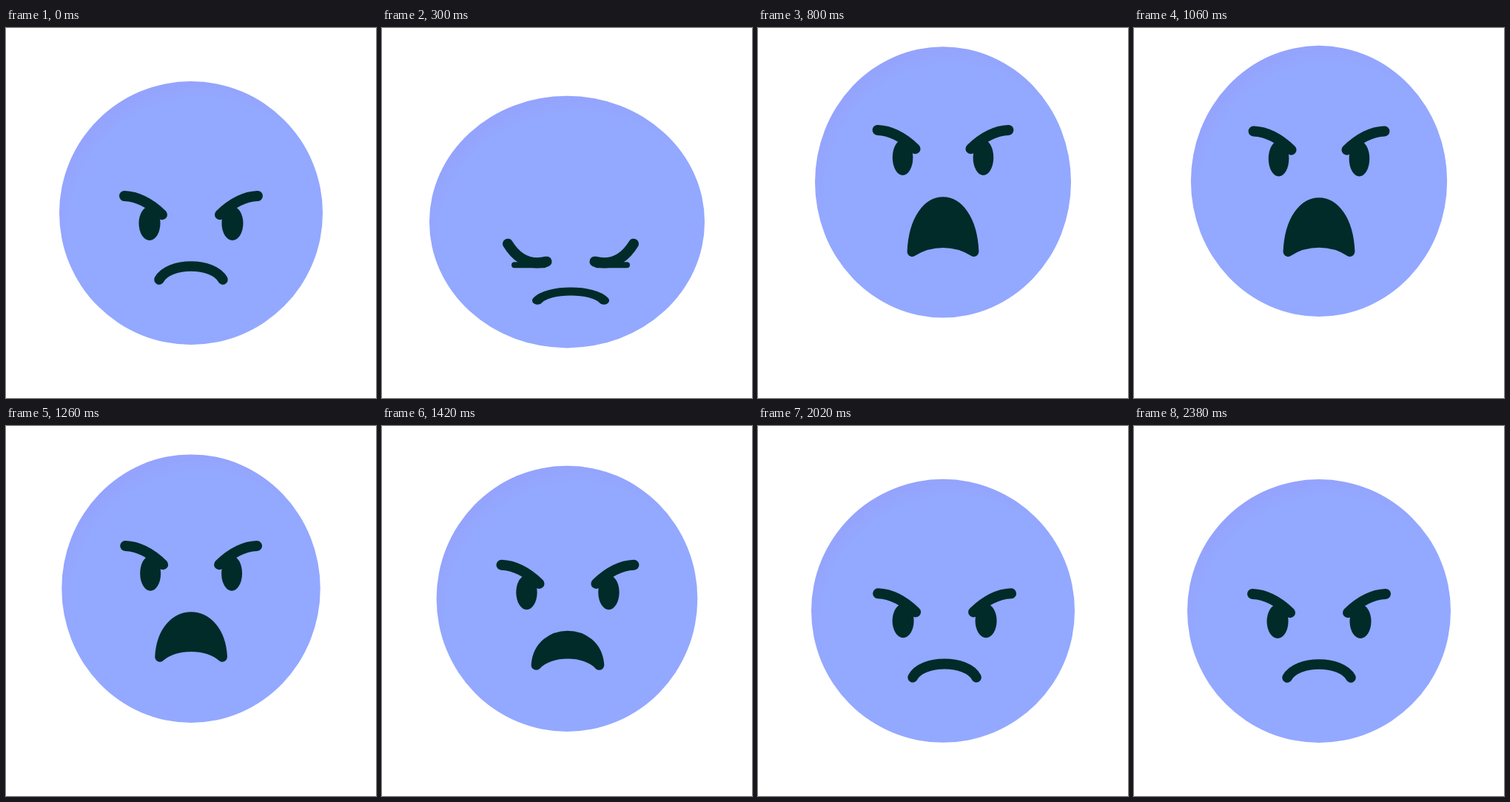
An HTML page that plays this animation: 500 by 500 pixels, repeating every 2.56 s.

```html
<!DOCTYPE html>
<html lang="en">
<head>
<meta charset="utf-8">
<title>Angry jump</title>
<style>
  html, body { margin: 0; width: 100%; height: 100%; overflow: hidden; background: #fff; }
  svg { display: block; width: 100%; height: 100%; }
</style>
</head>
<body>
<svg viewBox="0 0 500 500">
  <defs>
    <radialGradient id="skin" cx=".54" cy=".57" r=".6">
      <stop offset=".84" stop-color="#93a8ff"/>
      <stop offset="1" stop-color="#95a1fc"/>
    </radialGradient>
    <g id="eyeSide">
      <rect id="eye" fill="#002b29"/>
      <path id="brow" fill="none" stroke="#002b29" stroke-width="14" stroke-linecap="round"/>
    </g>
  </defs>
  <ellipse id="body" cx="250" fill="url(#skin)"/>
  <g id="eyes">
    <use id="left" href="#eyeSide"/>
    <use id="right" href="#eyeSide"/>
  </g>
  <path id="mouth" fill="#002b29" stroke="#002b29" stroke-width="13.6" stroke-linejoin="round"/>
</svg>
<script>
const LOOP = 2560, LAUNCH = 530, FALL = 1000, RADIUS = 178;

const mix = (a, b, k) => a + (b - a) * k;
const bell = (t, center, spread) => Math.exp(-(((t - center) / spread) ** 2));
// Soft start, long soft landing
const ease = (t, start, spread) => t < start ? 0 : 1 - bell(t, start, spread);

// A value that goes rest -> crouch -> jump -> rest, each stage at its own pace
const part = (rest, crouch, jump, { sink = 202, rise = 75, settle = 465 } = {}) => t => {
  const low = mix(rest, crouch, ease(t, 0, sink));
  const high = mix(low, jump, ease(t, LAUNCH, rise));
  return mix(high, rest, ease(t, FALL, settle));
};

const blinkPace = { sink: 120, rise: 45 };
const lipPace = { rise: 56 };
const bodyWidth = part(RADIUS, 187, 173, { settle: 400 });
const bodyY = part(250, 273, 206, { sink: 349, rise: 148, settle: 427 });
const eyeY = part(264, 327, 175, { rise: 84 });
const mouthY = part(340, 371.7, 301.5, { rise: 124 });
const upperLip = part(18, 15, 67, lipPace);
const lowerLip = part(18, 15, 12, lipPace);
const lowerBend = part(30, 30, 17, lipPace);
const eyeWidth = part(14.5, 24, 13.8, blinkPace);
const eyeHeight = part(23, 4, 24, blinkPace);
const blink = part(0, 1, 0, blinkPace);
const lean = part(0, 5.6, 0, { rise: 50 });

const set = (id, attrs) => {
  const el = document.getElementById(id);
  for (const name in attrs) el.setAttribute(name, attrs[name]);
};

function draw(t) {
  const rx = bodyWidth(t), stretch = rx / RADIUS, closed = blink(t);
  const x = 250 + lean(t) + 5 * bell(t, 1770, 270);
  set("body", { cy: bodyY(t), rx, ry: RADIUS / stretch });

  const w = eyeWidth(t), h = eyeHeight(t);
  set("eye", { x: -w, y: -h, width: 2 * w, height: 2 * h, rx: mix(w, 4, closed), ry: h });
  const point = (x0, y0, x1, y1) => `${mix(x0, x1, closed)} ${mix(y0, y1, closed)}`;
  set("brow", { d: `M${point(-34, -37, -29, -28.5)}Q${point(-8, -36, -9, 4)} ${point(17, -11.8, 23.5, -4.5)}` });
  const gap = 56 * Math.min(1, stretch);
  set("left", { transform: `translate(${-gap} 0)` });
  set("right", { transform: `translate(${gap} 0) scale(-1 1)` });
  set("eyes", { transform: `translate(${x} ${eyeY(t)})` });

  // A cubic reaches three quarters of its control height
  const up = upperLip(t), top = -up / .75, bottom = -lowerLip(t) / .75;
  const outer = Math.min(39, 30 + (up - 18) / 2), inner = lowerBend(t);
  set("mouth", {
    d: `M-43 0C${-outer} ${top} ${outer} ${top} 43 0C${inner} ${bottom} ${-inner} ${bottom} -43 0Z`,
    transform: `translate(${x} ${mouthY(t)}) scale(${stretch} ${1 - .2 * closed})`
  });
}

const start = performance.now();
function frame() {
  draw((performance.now() - start) % LOOP);
  requestAnimationFrame(frame);
}
frame();
</script>
</body>
</html>
```
